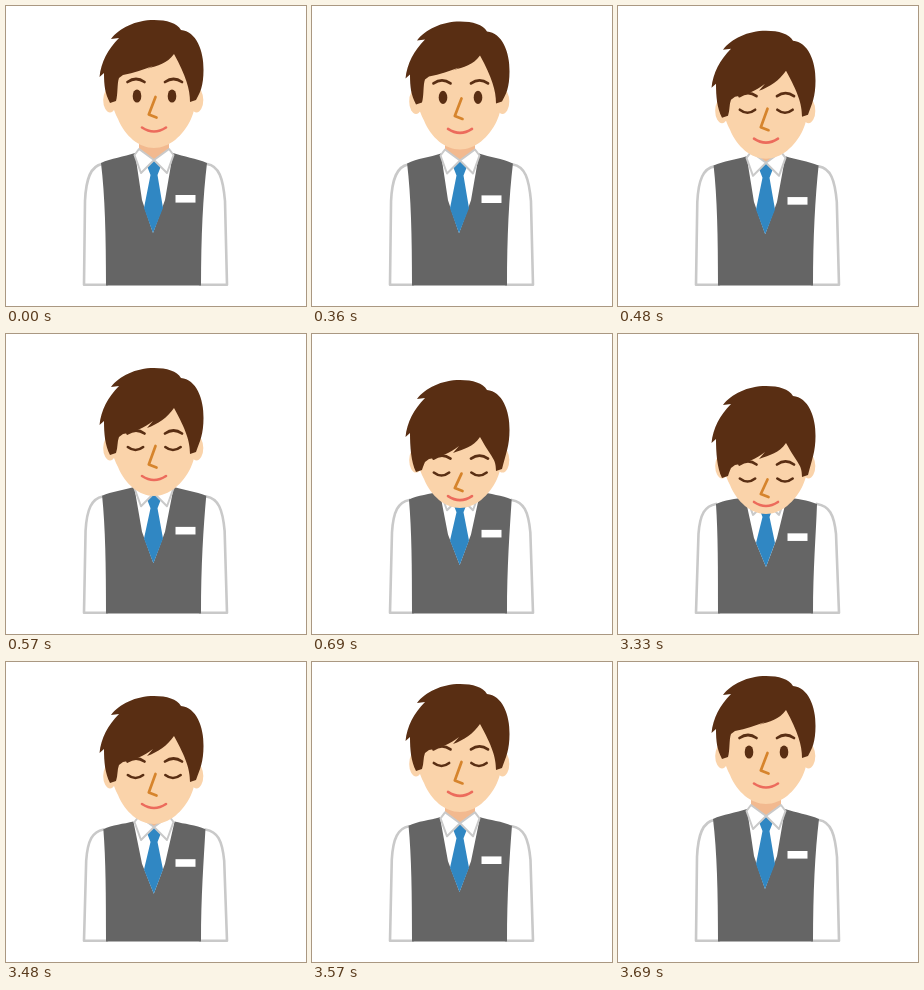
Animation, 300 px wide and 300 px high, one loop 4.5 s. Source, as an HTML page:

```html
<!DOCTYPE html>
<html lang="en">
<head>
<meta charset="utf-8">
<title>Bow</title>
<style>
  html, body { margin: 0; width: 100%; height: 100%; overflow: hidden; background: #fff; }
  svg { display: block; width: 100vw; height: 100vh; }
  path { stroke-linecap: round; stroke-linejoin: round; }
</style>
</head>
<body>
<svg viewBox="0 0 300 300"><g id="body"></g><g id="head"></g></svg>
<script>
const LOOP = 4500, STEP = 30, DROP = 40;
const HAIR = '#592e13', SKIN = '#fad3aa', SHADE = '#f2b98f', GREY = '#c9c9c9', VEST = '#656565', BLUE = '#3087c3';
const bodyGroup = document.getElementById('body');
const headGroup = document.getElementById('head');
const morphs = [];

function add(parent, tag, attrs) {
  const el = document.createElementNS('http://www.w3.org/2000/svg', tag);
  for (const name in attrs) el.setAttribute(name, attrs[name]);
  parent.append(el);
  return el;
}
const fill = (parent, color, d) => add(parent, 'path', { fill: color, d });
const line = (parent, color, width, d) =>
  add(parent, 'path', { fill: 'none', stroke: color, 'stroke-width': width, d });
const oval = (parent, color, cx, cy, rx, ry) => add(parent, 'ellipse', { fill: color, cx, cy, rx, ry });

// A body part that morphs from its upright to its bowed outline.
function part(color, width, up, down) {
  const el = add(bodyGroup, 'path', { fill: color, stroke: width ? GREY : 'none', 'stroke-width': width });
  morphs.push({ el, up, down: down.match(/-?[\d.]+/g).map(Number) });
}

// Sleeves and shirt
part('#fff', 2.6,
  'M96 158 C85 160 80 172 79 195 L78 278.7 L101 278.7',
  'M98 170 C87 172 82 180 80.5 200 L78 278.7 L101 278.7');
part('#fff', 2.6,
  'M201 158 C213 160 217 172 219 195 L221 278.7 L194 278.7',
  'M199 170 C211 172 216 180 218 200 L221 278.7 L194 278.7');
part('#fff', 0,
  'M128 147 L168 147 L160 195 L147 228 L134 195 Z',
  'M127 163 L169 163 L160 205 L148 234 L135 205 Z');

// Vest
part(VEST, 0,
  'M95 157 C105 152 118 151 129 147 L136 194 L147 227 L159 194 L167 147 C178 151 190 152 201 157 C197 190 195 230 195 279.5 L100 279.5 C100 230 99 190 95 157 Z',
  'M98 170 C106 166 118 165 127 163 L136 204 L148 233 L159 204 L169 163 C178 165 190 166 199 170 C198 200 195 235 195 279.5 L100 279.5 C100 235 100 200 98 170 Z');

// Neck, tie, collar and name tag
part(SHADE, 0,
  'M133 136 L163 136 L163 144 L148 155 L133 144 Z',
  'M133 150 L163 150 L163 158 L148 169 L133 158 Z');
part(BLUE, 0,
  'M143 155 L153 155 L155 160 L151.5 169 L157 202 L147 227 L138 202 L144.5 169 L141 160 Z',
  'M143 169 L153 169 L155 174 L151.5 183 L157 209 L148 233 L138 209 L144.5 183 L141 174 Z');
part('#fff', 2,
  'M133 143 L128.5 149 L135 167 L148 154 Z',
  'M133 157 L128.5 163 L135 181 L148 168 Z');
part('#fff', 2,
  'M163 143 L167.5 149 L161 167 L148 154 Z',
  'M163 157 L167.5 163 L161 181 L148 168 Z');
part('#fff', 0,
  'M169.5 189 L189.5 189 L189.5 196.6 L169.5 196.6 Z',
  'M169.5 199.4 L189.5 199.4 L189.5 207 L169.5 207 Z');

// One head drawing; the heights say how far the face is turned down.
function makeHead({ parting, tip, jag, burn, brow, eye, nose, noseEnd, mouth, awake }) {
  const g = add(headGroup, 'g', {});
  for (const x of [104, 190.5]) oval(g, SKIN, x, 94, 6.8, 12.5);
  fill(g, SKIN, 'M105 70 C104 90 106 102 112 113 C119 130 133 142 148 142 C163 142 177 130 185 113 C190 102 191 90 190 70 C178 30 115 30 105 70 Z');
  for (const x of [130, 167.5]) {
    line(g, HAIR, 2.7, `M${x - 8.5} ${brow} Q${x} ${brow - 6} ${x + 8.5} ${brow}`);
    if (!awake) line(g, HAIR, 2.5, `M${x - 8.2} ${eye} Q${x - 0.5} ${eye + 6} ${x + 7.2} ${eye}`);
  }
  if (awake) for (const x of [131, 166]) oval(g, HAIR, x, eye, 4.3, 6.6);
  line(g, '#d6842c', 2.7, `M149.5 ${nose} L142.8 ${noseEnd} L150.5 ${noseEnd + 3}`);
  line(g, '#ec6b5c', 2.6, `M136 ${mouth} Q148 ${mouth + 8} 160 ${mouth}`);
  fill(g, HAIR, `M93.5 71 C95 56 102 43 113 32 L105 33 C113 22 130 14 148 14
    C161 14 171 17 175 24 C190 25 198 45 197.5 64 C197.5 80 194 87 190 ${burn - 3}
    L184 ${burn - 1} C184 ${burn - 14} 180 ${parting + 22} 168 ${parting}
    C161 ${parting + 10} 152 ${tip - 4} 141 ${tip} L147 ${tip - jag}
    C138 ${tip} 128 ${tip + 4} 117 ${tip + 6} L113 ${tip + 9}
    C111 ${tip + 14} 112 ${burn - 8} 110 ${burn - 2} L104 ${burn}
    C99 ${burn - 10} 98 80 98 67 Z`);
  return g;
}
const heads = [
  makeHead({ parting: 48, tip: 63, jag: 3, burn: 97, brow: 76, eye: 90, nose: 91, noseEnd: 108.5, mouth: 121.5, awake: true }),
  makeHead({ parting: 54, tip: 74, jag: 7, burn: 101, brow: 79.5, eye: 93, nose: 92, noseEnd: 110.5, mouth: 122, awake: false }),
  makeHead({ parting: 71, tip: 87, jag: 7, burn: 106, brow: 92.5, eye: 106.5, nose: 107.5, noseEnd: 122, mouth: 130, awake: false })
];

const clamp = x => Math.min(1, Math.max(0, x));
const ease = x => (x + (1 - Math.cos(Math.PI * x)) / 2) / 2;
const span = (t, from, length) => clamp((t - from) / length);

function morph({ el, up, down }, p) {
  let i = 0;
  el.setAttribute('d', up.replace(/-?[\d.]+/g, n => +(+n + (down[i++] - n) * p).toFixed(2)));
}

function draw(now) {
  const t = Math.floor((now % LOOP) / STEP) * STEP;
  const bow = ease(span(t, 330, 480)) - ease(span(t, 3300, 360));
  // The body follows the head on the way up.
  const lean = span(t, 300, 510) ** 1.55 - span(t, 3300, 390) ** 2;
  const pose = bow < 0.14 ? 0 : bow < 0.65 ? 1 : 2;
  for (const m of morphs) morph(m, lean);
  heads.forEach((g, i) => g.setAttribute('visibility', i === pose ? 'visible' : 'hidden'));
  headGroup.setAttribute('transform', `translate(0 ${(bow * DROP).toFixed(2)})`);
}

const start = performance.now();
function tick() {
  draw(performance.now() - start);
  requestAnimationFrame(tick);
}
tick();
</script>
</body>
</html>
```
